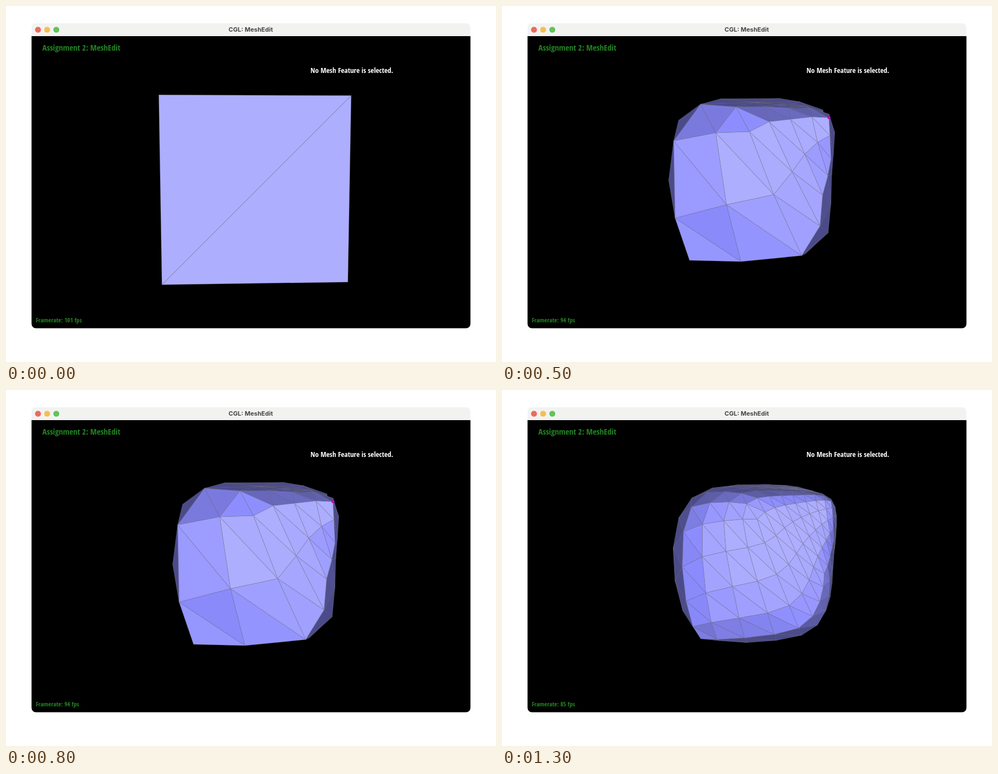
These frames come from a looping animation (877x638 px, 1.5 s). An HTML page:

```html
<!DOCTYPE html>
<html lang="en">
<head>
<meta charset="utf-8">
<title>MeshEdit</title>
<style>
  html, body { margin: 0; width: 100%; height: 100%; overflow: hidden; background: #fff; }
  svg { display: block; width: 877px; height: 638px; }
  .title { font: 700 11px Inter, sans-serif; fill: #454545; text-anchor: middle; }
  .hud { font-family: "Open Sans Condensed", "Open Sans", sans-serif; font-weight: 700; font-stretch: 75%; fill: #228522; }
  .mesh { stroke: rgba(120, 120, 140, .45); stroke-width: .8; stroke-linejoin: round; }
</style>
</head>
<body>
<svg viewBox="0 0 877 638">
  <path d="M45.700 54H831.300V569.500a8 8 0 0 1-8 8H53.700a8 8 0 0 1-8-8Z"/>
  <path d="M45.700 54V39a8 8 0 0 1 8-8H823.300a8 8 0 0 1 8 8V54Z" fill="#f2f3f1"/>
  <circle cx="57.3" cy="42.5" r="5.3" fill="#ec6a5e"/>
  <circle cx="73.6" cy="42.5" r="5.3" fill="#f4bf4f"/>
  <circle cx="90" cy="42.5" r="5.3" fill="#61c554"/>
  <text class="title" x="438" y="46">CGL: MeshEdit</text>
  <text class="hud" x="65" y="80" font-size="14.85">Assignment 2: MeshEdit</text>
  <text class="hud" x="545" y="119.5" font-size="13.15" style="fill:#fff">No Mesh Feature is selected.</text>
  <text class="hud" id="fps" x="53.5" y="567" font-size="11.2"></text>
  <g id="stage"></g>
</svg>
<script>
const STEP = 500;
const CENTER = { x: 438.8, y: 315.8 };
const FOCAL = 916, DISTANCE = 6.4;

// Corner bits give the signs: 1 = right, 2 = top, 4 = front.
// Each quad is cut along the diagonal from its first to its third corner.
function cube(front) {
  const verts = Array.from({ length: 8 }, (_, i) => [1, 2, 4].map(bit => i & bit ? 1 : -1));
  const faces = [front, "6732", "5137", "0462", "1540", "1023"].flatMap(quad => {
    const [a, b, c, d] = [...quad].map(Number);
    return [[a, b, c], [a, c, d]];
  });
  return { verts, faces };
}

const blend = (...terms) => [0, 1, 2].map(k => terms.reduce((sum, [p, w]) => sum + p[k] * w, 0));

// Cut edge a-b in half and return the new vertex.
function split(mesh, a, b) {
  const m = mesh.verts.push(blend([mesh.verts[a], .5], [mesh.verts[b], .5])) - 1;
  mesh.faces = mesh.faces.flatMap(f => f.includes(a) && f.includes(b)
    ? [f.map(i => i === a ? m : i), f.map(i => i === b ? m : i)]
    : [f]);
  return m;
}

// A cube with edges halved again and again towards one corner, which keeps it sharp.
function sharpCube(tip) {
  const mesh = cube("5764");
  const top = split(mesh, 6, 3), right = split(mesh, 5, 3);
  const halves = [6, 5, 3].map(end => split(mesh, end, tip));
  for (const v of [...halves, top, right]) split(mesh, v, tip);
  return mesh;
}

// One round of Loop subdivision on a closed mesh.
function subdivide({ verts, faces }) {
  const edges = new Map(), near = verts.map(() => []);
  const key = (a, b) => Math.min(a, b) + "-" + Math.max(a, b);
  for (const f of faces) {
    f.forEach((a, k) => {
      const b = f[(k + 1) % 3], id = key(a, b);
      if (!edges.has(id)) {
        edges.set(id, { a, b, sides: [], index: verts.length + edges.size });
        near[a].push(b);
        near[b].push(a);
      }
      edges.get(id).sides.push(f[(k + 2) % 3]);
    });
  }
  const moved = verts.map((p, i) => {
    const n = near[i].length, u = n === 3 ? 3 / 16 : 3 / 8 / n;
    return blend([p, 1 - n * u], ...near[i].map(j => [verts[j], u]));
  });
  const middles = [...edges.values()].map(({ a, b, sides: [c, d] }) =>
    blend([verts[a], 3 / 8], [verts[b], 3 / 8], [verts[c], 1 / 8], [verts[d], 1 / 8]));
  const mid = (a, b) => edges.get(key(a, b)).index;
  return {
    verts: [...moved, ...middles],
    faces: faces.flatMap(([a, b, c]) => {
      const ab = mid(a, b), bc = mid(b, c), ca = mid(c, a);
      return [[a, ab, ca], [ab, b, bc], [ca, bc, c], [ab, bc, ca]];
    })
  };
}

function turn([x, y, z], yaw, pitch) {
  const depth = z * Math.cos(yaw) - x * Math.sin(yaw);
  return [
    x * Math.cos(yaw) + z * Math.sin(yaw),
    y * Math.cos(pitch) - depth * Math.sin(pitch),
    y * Math.sin(pitch) + depth * Math.cos(pitch)
  ];
}

function project([x, y, z]) {
  const scale = FOCAL / (DISTANCE - z);
  return [CENTER.x + x * scale, CENTER.y - y * scale];
}

const minus = (a, b) => a.map((n, k) => n - b[k]);
const cross = (a, b) => [a[1] * b[2] - a[2] * b[1], a[2] * b[0] - a[0] * b[2], a[0] * b[1] - a[1] * b[0]];
const dot = (a, b) => a.reduce((sum, n, k) => sum + n * b[k], 0);

// The light shines along the view; blue saturates first.
function shade(normal) {
  const facing = normal[2] / Math.hypot(...normal);
  const r = Math.round(Math.min(174, 178 * Math.max(.42, facing)));
  return `rgb(${r},${r},${Math.min(255, Math.round(r * 1.82))})`;
}

function draw({ mesh, yaw, pitch, dot: marked }) {
  const verts = mesh.verts.map(p => turn(p, yaw, pitch));
  const screen = verts.map(p => project(p).map(n => n.toFixed(2)));
  const polygons = mesh.faces
    .map(f => {
      const [a, b, c] = f.map(i => verts[i]);
      const normal = cross(minus(b, a), minus(c, a));
      return { f, normal, near: dot(normal, minus([0, 0, DISTANCE], a)) > 0, z: a[2] + b[2] + c[2] };
    })
    .filter(face => face.near)
    .sort((p, q) => p.z - q.z)
    .map(({ f, normal }) => `<polygon points="${f.map(i => screen[i]).join(" ")}" fill="${shade(normal)}"/>`);
  if (marked !== undefined) {
    const [x, y] = screen[marked];
    polygons.push(`<circle cx="${x}" cy="${y}" r="2.6" fill="#c800b4" stroke="none"/>`);
  }
  return `<g class="mesh">${polygons.join("")}</g>`;
}

const TIP = 7;
const coarse = subdivide(sharpCube(TIP));
const scenes = [
  { mesh: cube("4576"), yaw: .049, pitch: .092, fps: 101 },
  { mesh: coarse, yaw: -.095, pitch: .246, fps: 94, dot: TIP },
  { mesh: subdivide(coarse), yaw: -.04, pitch: .23, fps: 85 }
];

const stage = document.getElementById("stage"), fps = document.getElementById("fps");
stage.innerHTML = scenes.map(draw).join("");

const start = performance.now();
function tick() {
  const now = Math.floor((performance.now() - start) / STEP) % scenes.length;
  [...stage.children].forEach((g, i) => g.style.display = i === now ? "" : "none");
  fps.textContent = `Framerate: ${scenes[now].fps} fps`;
  requestAnimationFrame(tick);
}
tick();
</script>
</body>
</html>
```
